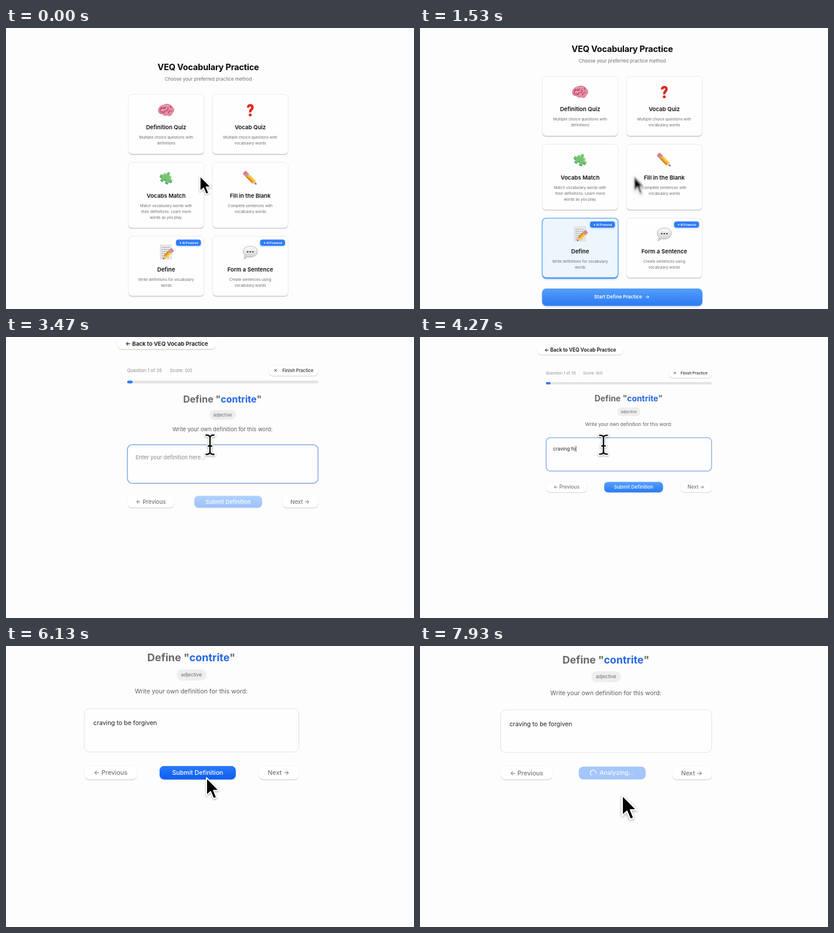
Recreate the animation shown at these times as an HTML page. Size 696 by 480 pixels, loop 8 s.

```html
<!DOCTYPE html>
<html lang="en">
<head>
<meta charset="utf-8">
<title>Vocabulary practice</title>
<style>
  html, body { margin: 0; width: 100%; height: 100%; overflow: hidden; background: #fdfdfd; }
  svg { display: block; width: 100%; height: 100%; font-family: Inter, "Open Sans", sans-serif; }
  text { white-space: pre; }
  .cursor { filter: drop-shadow(0 1.5px 1.5px rgba(0, 0, 0, .35)); }
  .glow { filter: drop-shadow(0 1px 1.5px rgba(47, 124, 246, .4)); }
</style>
</head>
<body>
<svg id="stage" viewBox="0 0 696 480" xmlns="http://www.w3.org/2000/svg">
  <defs>
    <linearGradient id="soft" x2="0" y2="1"><stop stop-color="#559ffd"/><stop offset="1" stop-color="#2b7bf3"/></linearGradient>
    <linearGradient id="deep" x2="0" y2="1"><stop stop-color="#2a79fb"/><stop offset="1" stop-color="#0d5df0"/></linearGradient>
    <linearGradient id="bubble" x2="0" y2="1"><stop stop-color="#fff"/><stop offset="1" stop-color="#c9cace"/></linearGradient>
    <filter id="smear" x="-60%" y="-60%" width="220%" height="220%"><feGaussianBlur id="smearBlur" stdDeviation="0"/></filter>

    <g id="pencil">
      <path d="M-13-3h4v6h-4q-2-3 0-6Z" fill="#e8798b"/>
      <path d="M-9-3h3v6h-3Z" fill="#9aa1a9"/>
      <path d="M-6-3H8v6H-6Z" fill="#f9b02c"/>
      <path d="M-6-3H8v1.800H-6Z" fill="#ffd65c"/>
      <path d="M-6 1.200H8V3H-6Z" fill="#d97f18"/>
      <path d="M8-3L14 0L8 3Z" fill="#ecc795"/>
      <path d="M11.500-1.250L14 0L11.500 1.250Z" fill="#333"/>
    </g>
    <g id="brain">
      <path d="M-13 2C-14-4-9-9-4-9C1-12 8-10 10-6C14-3 14 3 10 5C10 9 5 11 2 8C-2 10-6 8-6 6C-9 7-13 5-13 2Z" fill="#e58da2" stroke="#c25a78" stroke-width=".8"/>
      <path d="M-10 1q0-5 4-4t5-3M-4 5q0-4 4-4t3-5M4 5q0-4 5-4M-9-3q2-3 5-3M4-8q4 0 4 4M-10 3q3-1 5 1" fill="none" stroke="#ab3a60" stroke-width="1.200" stroke-linecap="round"/>
      <path d="M-7-6q3-2 5-1M2-8q3-1 4 0M-8 0q1-2 3-1" fill="none" stroke="#f8bccb" stroke-width="1.200" stroke-linecap="round"/>
    </g>
    <g id="question" fill="none" stroke="#dc2a1e" stroke-width="4.200">
      <path d="M-3.700-4.500Q-3.500-8.500 0-8.500Q3.700-8.500 3.700-5Q3.700-2.500 1.500-1Q0 0 0 3.800"/>
      <circle cy="8" r="2.500" fill="#dc2a1e" stroke="none"/>
    </g>
    <path id="jigsaw" d="M-7-7H-2C-5.500-13 5-13 1.500-7H7V-2C13-5.500 13 5 7 1.500V7H1.500C4.500 1.500-5 1.500-2 7H-7V1.500C-13 5-13-5.500-7-2Z"/>
    <g id="puzzle" transform="rotate(28)">
      <use href="#jigsaw" transform="translate(.2 1.500)" fill="#3d9349"/>
      <use href="#jigsaw" fill="#76c573"/>
      <path d="M-6.500-6H-2M2-6H6V-2" fill="none" stroke="#a5e09b" stroke-width="1.200"/>
    </g>
    <use id="fill" href="#pencil" transform="rotate(45) scale(1.080 1.250)"/>
    <g id="memo">
      <path d="M-10-12H9V12H-10Z" fill="#ededee" stroke="#c4c4c8" stroke-width=".7"/>
      <path d="M-8-8H7M-8-4.500H6M-8-1H4M-8 2.500H1M-8 6H-2M-8 9H5" stroke="#8f9096" stroke-width="1" stroke-dasharray="3 .7"/>
      <use href="#pencil" transform="translate(3 3.500) rotate(135) scale(.85 1.150)"/>
    </g>
    <g id="speech">
      <path d="M-12-1C-12-7-7-10 0-10S12-7 12-1S7 8.500 0 8.500Q-3 8.500-5 8Q-7 11-11 11.500Q-8.500 9-9 6Q-12 3-12-1Z" fill="url(#bubble)" stroke="#a9aaaf" stroke-width=".9"/>
      <g fill="#3d3e42"><circle cx="-4.500" cy="-.5" r="1.300"/><circle cy="-.5" r="1.300"/><circle cx="4.500" cy="-.5" r="1.300"/></g>
    </g>
    <path id="beamShape" d="M-6-15.500Q0-15.500 0-11V11Q0 15.500-6 15.500M6-15.500Q0-15.500 0-11M0 11Q0 15.500 6 15.500M-2.500 2H2.500"/>
  </defs>
  <g id="menu"></g>
  <g id="quiz"></g>
  <g id="pointer">
    <path id="arrow" class="cursor" d="M0 0V26L6 20.500L10.300 30.800L14.800 28.900L10.500 18.700H18.500Z" stroke="#fff" stroke-width="1.700" stroke-linejoin="round"/>
    <path id="hand" class="cursor" d="M-1 15V2.500Q-1 .8 .7 .8T2.500 2.500V9.500Q4.800 8 6.500 10Q9 9 10.500 11Q14.500 10.300 14.500 13.500V17.500Q14.500 20.500 13 23V26H3V23.500Q-1 20-4.500 15.500Q-5 12.500-2.700 13L-1 15ZM2.500 9.500V14M6.500 10.500V14M10.500 11.500V14M4.500 18V22M7.500 18V22M10.500 18V22" fill="#fff" stroke="#111" stroke-width="1.300" stroke-linejoin="round"/>
    <g id="beam" class="cursor" fill="none" stroke-linecap="square">
      <use href="#beamShape" stroke="#fff" stroke-width="5.500"/>
      <use href="#beamShape" stroke="#111" stroke-width="2.400"/>
    </g>
  </g>
</svg>
<script>
const LOOP = 8000;
const $ = id => document.getElementById(id);
const clamp = v => Math.max(0, Math.min(1, v));
const ease = u => u * u * (3 - 2 * u);

function set(el, attrs) {
  for (const name in attrs) el.setAttribute(name, attrs[name]);
}

// Smooth interpolation through rows of [time, ...values].
function track(rows, t) {
  if (t <= rows[0][0]) return rows[0].slice(1);
  for (let i = 1; i < rows.length; i++) {
    const a = rows[i - 1], b = rows[i];
    if (t < b[0]) {
      const p = ease((t - a[0]) / (b[0] - a[0]));
      return a.slice(1).map((v, k) => v + (b[k + 1] - v) * p);
    }
  }
  return rows[rows.length - 1].slice(1);
}

const label = (x, y, size, str, fill, weight = 400, anchor = 'middle', extra = '') =>
  `<text x="${x}" y="${y + size * .36}" font-size="${size}" font-weight="${weight}" fill="${fill}" text-anchor="${anchor}" ${extra}>${str}</text>`;
const box = (x, y, w, h, r, fill, extra = '') =>
  `<rect x="${x}" y="${y}" width="${w}" height="${h}" rx="${r}" fill="${fill}" ${extra}/>`;
const raised = (x, y, w, h, r) =>
  box(x, y + 1.8, w, h, r, '#d9d9dc') + box(x, y, w, h, r, '#fff', 'stroke="#f3f3f5" stroke-width=".7"');

const ROWS = [[113.5, 103], [229.7, 113], [355.8, 103]];
const CARDS = [
  ['brain', 'Definition Quiz', 'Multiple choice questions with|definitions'],
  ['question', 'Vocab Quiz', 'Multiple choice questions with|vocabulary words'],
  ['puzzle', 'Vocabs Match', 'Match vocabulary words with|their definitions. Learn more|words as you play.'],
  ['fill', 'Fill in the Blank', 'Complete sentences with|vocabulary words'],
  ['memo', 'Define', 'Write definitions for vocabulary|words'],
  ['speech', 'Form a Sentence', 'Create sentences using|vocabulary words']
];

function card([icon, title, text], i) {
  const x = i % 2 ? 352 : 208.5, [y, h] = ROWS[i >> 1], mid = x + 64.7;
  const badge = i < 4 ? '' :
    box(x + 81.5, y + 5.7, 42.5, 10.4, 4, '#2f7cf6', 'class="glow"') + label(x + 103, y + 11, 4.9, '✦ AI Powered', '#fff', 600);
  return `<g id="card${i}">` +
    box(x, y + 1.9, 129.4, h - 1.5, 6.5, '#d0d0d3', 'class="edge"') +
    box(x, y, 129.4, h - 1.5, 6.5, '#fefefe', 'class="face" stroke="#e9e9eb" stroke-width=".9"') +
    `<use href="#${icon}" transform="translate(${mid} ${y + 27})"/>` +
    label(mid, y + 56.4, 9.6, title, '#111', 600) +
    text.split('|').map((s, k) => label(mid, y + 73.6 + k * 10, 6.4, s, '#6c6c70')).join('') +
    badge + '</g>';
}

$('menu').innerHTML =
  label(345, 67, 14.5, 'VEQ Vocabulary Practice', '#0c0c0d', 700, 'middle', 'letter-spacing="-.2"') +
  label(345, 87.5, 7.95, 'Choose your preferred practice method', '#6c6c70') +
  CARDS.map(card).join('') +
  '<g id="start">' + box(208.5, 477.2, 273, 28.5, 6.5, '#4f8ae8', 'class="glow"') +
  box(208.5, 476, 273, 28.5, 6.5, 'url(#soft)') +
  box(208.5, 476, 273, 28.5, 6.5, 'url(#deep)', 'id="startHover"') +
  label(297, 490, 8.2, 'Start Define Practice', '#fff', 600, 'start') +
  label(388, 490, 8.2, '→', '#fff', 600) + '</g>';

$('quiz').innerHTML =
  raised(114, -99, 190, 22, 9) + label(209, -87.6, 10.8, '← Back to VEQ Vocab Practice', '#111', 600) +
  label(133, -36, 8.7, 'Question 1 of 35', '#8a8a8e', 400, 'start') +
  label(215, -36, 8.7, 'Score: 0/0', '#8a8a8e', 400, 'start') +
  raised(405, -46, 95, 20, 8) + label(418, -36, 9, '✕', '#444', 500) +
  label(431, -36, 8.4, 'Finish Practice', '#444', 600, 'start') +
  box(133, -16.3, 367, 5.4, 2.7, '#e3e3e6') + box(133, -16.3, 10.5, 5.4, 2.7, '#2f7cf6') +
  label(316, 20, 18, 'Define "<tspan fill="#2467e4">contrite</tspan>"', '#69696c', 700) +
  box(291, 40, 51, 19, 9, '#eeeeef') + label(316.3, 49.5, 8.3, 'adjective', '#6c6c70') +
  label(316, 77.5, 10.5, 'Write your own definition for this word:', '#5f5f63') +
  box(133.5, 107, 366, 74, 9, '#fefefe', 'id="field"') +
  label(149, 131.5, 10.5, '', '#222', 400, 'start', 'id="entry"') +
  '<rect id="caret" y="125" width="1" height="13" fill="#111"/>' +
  raised(133.5, 205, 90, 22.5, 8) + label(178.5, 216.5, 10.7, '← Previous', '#77777a', 500) +
  raised(431, 205, 69, 22.5, 8) + label(465, 216.5, 10.7, 'Next →', '#77777a', 500) +
  '<g id="submit">' + box(262, 206.3, 130, 22.5, 8, '#1f62d0', 'opacity=".5"') +
  box(262, 205, 130, 22.5, 8, 'url(#soft)') +
  box(262, 205, 130, 22.5, 8, 'url(#deep)', 'id="submitHover"') +
  label(327, 216.5, 10.6, 'Submit Definition', '#fff', 500) + '</g>' +
  '<g id="busy">' + box(269, 205.5, 116, 22.5, 8, '#a5c6fb') +
  '<path id="spinner" d="M-3.5 3.5A5 5 0 1 1 5 0" fill="none" stroke="#fff" stroke-width="1.300" stroke-linecap="round"/>' +
  label(305, 216.5, 10.6, 'Analyzing...', '#f4f8ff', 500, 'start') + '</g>';

const POINTER = [
  [0, 331, 253], [430, 276, 404], [780, 276, 400], [1200, 276, 400], [1640, 381, 226],
  [2150, 349, 459], [2650, 349, 459], [3300, 348, 184], [3470, 348, 184],
  [4270, 313, 184], [5350, 313, 184], [6000, 342, 225], [6200, 342, 225], [7300, 345, 255]
];
const POINTER_SIZE = [[3000, 1], [3700, 1.08], [4300, 1.04], [5300, 1], [6000, 1.33]];
const SHAPES = [
  [330, 'arrow'], [1280, 'hand'], [1980, 'arrow'], [2780, 'hand'],
  [3200, 'arrow'], [5550, 'beam'], [LOOP, 'arrow']
];
const PRESSES = [500, 2450, 6120];
const CLICK = 500, OPEN = 2720, SUBMIT = 6280;

function camera(t) {
  if (t < 5300) {
    const [s] = track([[3045, .744], [3750, .965], [4417, .744]], t);
    return [s, 268 - 202 * s, 92.8 - 4.3 * s];
  }
  return track([[5300, .744, 117.8, 89.6], [6050, 1, 0, 0], [6150, 1, 0, 0], [7000, .984, 6.1, 3.7]], t);
}

// A false start is typed, erased and replaced.
function typed(t) {
  if (t < 4430) return 'craving fo'.slice(0, Math.max(0, Math.floor((t - 3540) / 70)));
  if (t < 4530) return 'craving f';
  if (t < 4630) return 'craving ';
  return 'craving to be forgiven'.slice(0, 8 + Math.floor((t - 4600) / 60));
}

function drawMenu(t) {
  const picked = t >= CLICK;
  const scroll = 31 * ease(clamp((t - 540) / 290));
  set($('menu'), { transform: `translate(0 ${-scroll})` });
  const edge = $('card4').querySelector('.edge'), face = $('card4').querySelector('.face');
  edge.classList.toggle('glow', picked);
  set(edge, { fill: picked ? '#3f8ff5' : '#d0d0d3' });
  set(face, {
    fill: picked ? '#edf5fd' : '#fefefe',
    stroke: picked ? '#5da3f6' : '#e9e9eb',
    'stroke-width': picked ? 1.3 : .9
  });
  set($('start'), { opacity: picked ? 1 : 0 });
  set($('startHover'), { opacity: clamp((t - 2000) / 150) });
}

function drawQuiz(t) {
  const [s, x, y] = camera(t), text = typed(t), focus = t < 6090, busy = t >= SUBMIT;
  const entry = $('entry');
  set($('quiz'), { transform: `translate(${x} ${y}) scale(${s})` });
  set($('field'), { stroke: focus ? '#94b6e4' : '#e1e1e4', 'stroke-width': focus ? 2 : 1 });
  entry.textContent = text || 'Enter your definition here...';
  set(entry, { fill: text ? '#222' : '#8a8a8e' });
  set($('caret'), {
    x: 149.5 + (text ? entry.getComputedTextLength() : 0),
    opacity: focus && text && (t < 5500 || t % 1000 < 500) ? 1 : 0
  });
  set($('submit'), { opacity: busy ? 0 : text ? 1 : .45 });
  set($('submitHover'), { opacity: clamp((t - 5850) / 150) });
  set($('busy'), { opacity: busy ? 1 : 0 });
  set($('spinner'), { transform: `translate(294 216.7) rotate(${(t - 7930) * .36})` });
}

function drawPointer(t) {
  const [x, y] = track(POINTER, t), [px, py] = track(POINTER, t - 16);
  const press = Math.max(...PRESSES.map(p => clamp(1 - Math.abs(t - p) / 110)));
  const size = track(POINTER_SIZE, t)[0] * (1 - .14 * press);
  const shape = SHAPES.find(([end]) => t < end)[1];
  for (const id of ['arrow', 'hand', 'beam']) set($(id), { display: id === shape ? 'inline' : 'none' });

  const blur = d => Math.max(0, Math.abs(d) - .8) * .32;
  const bx = blur(x - px), by = blur(y - py);
  set($('smearBlur'), { stdDeviation: `${bx} ${by}` });
  set($('pointer'), {
    transform: `translate(${x} ${y}) scale(${size})`,
    filter: bx + by > .1 ? 'url(#smear)' : 'none'
  });
}

function draw(t) {
  const menu = t < OPEN;
  set($('menu'), { display: menu ? 'inline' : 'none' });
  set($('quiz'), { display: menu ? 'none' : 'inline' });
  if (menu) drawMenu(t);
  else drawQuiz(t);
  drawPointer(t);
}

const began = performance.now();
function tick() {
  draw((performance.now() - began) % LOOP);
  requestAnimationFrame(tick);
}
tick();
</script>
</body>
</html>
```
